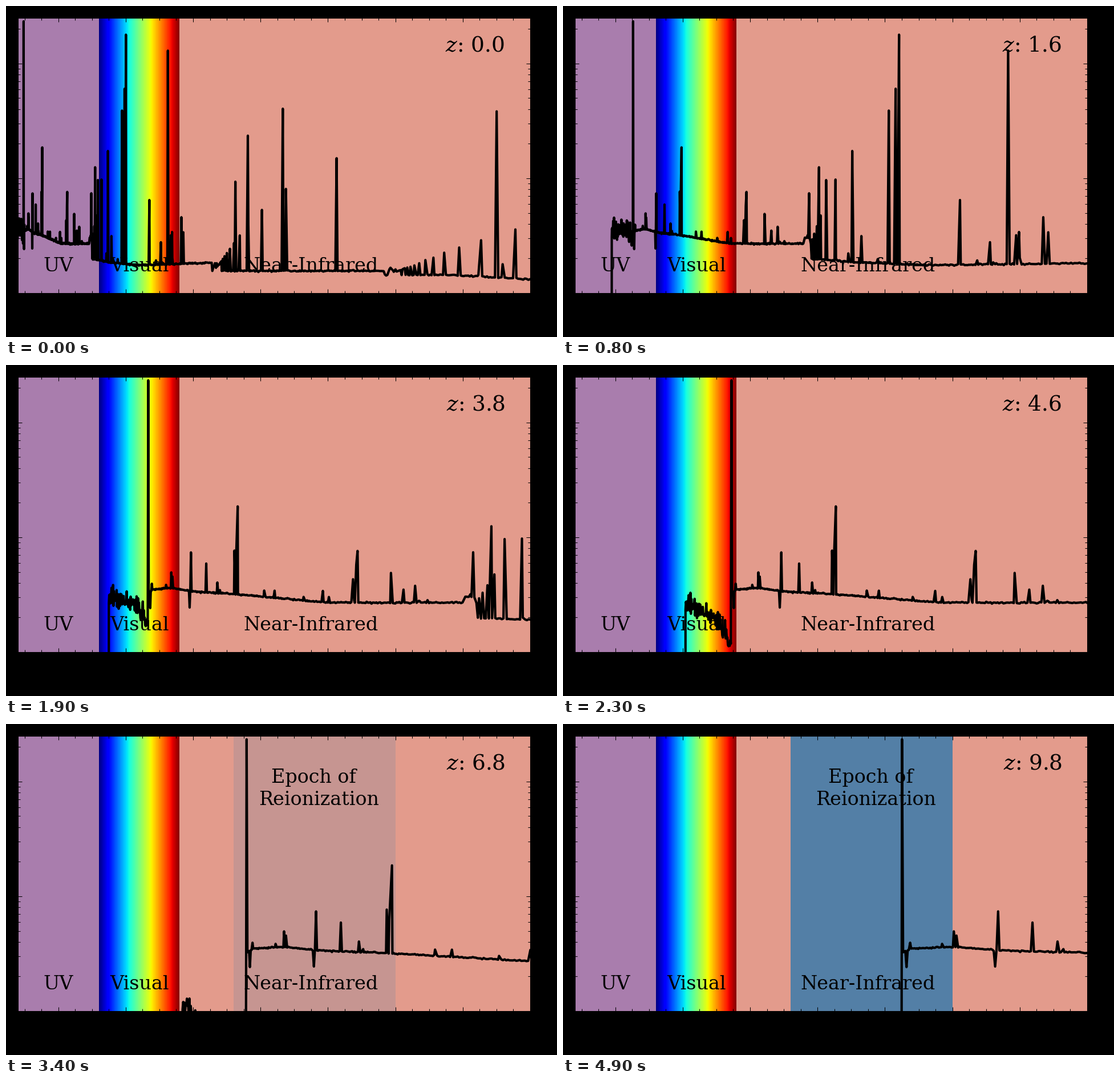
Recreate the animation shown at these times as a matplotlib script. Size 966 by 580 pixels, loop 5 s.

```python
import numpy as np
import matplotlib.pyplot as plt
from matplotlib.animation import FuncAnimation
from matplotlib.ticker import MultipleLocator

W, H, DPI = 966, 580, 150
LEFT, RIGHT, TOP, BOTTOM = 20.7, 919, 21, 503
FRAMES, INTERVAL, Z_STEP = 50, 100, 0.2
LYMAN_LIMIT, LYMAN_ALPHA = 911.76, 1216
EPOCH_START, LAYER_ALPHA = 9000, 0.075

plt.rcParams.update({
    "font.family": "DejaVu Serif",
    "mathtext.fontset": "dejavuserif",
    "axes.linewidth": 0.5,
})

# Key points of the continuum: rest wavelength in angstrom and flux.
CONTINUUM = [
    (912, 0.37), (1150, 0.36), (1200, 0.31), (1250, 0.35), (1400, 0.362),
    (1560, 0.337), (1850, 0.322), (2600, 0.27), (3735, 0.27), (3746, 0.2),
    (4400, 0.185), (5500, 0.175), (8200, 0.184), (8205, 0.156),
    (14580, 0.156), (14590, 0.144), (17000, 0.144), (20000, 0.132),
]

# Hydrogen series by lower level: strength of the first line, decay power.
SERIES = {2: (12.8, 3.05), 3: (3.7, 2.5), 4: (1.67, 2.2)}

# Helium and metal lines: rest wavelength and height above the continuum.
LINES = {
    1244: 0.05, 1394: 0.14, 1403: 0.09, 1546: 0.40, 1664: 0.26, 1750: 0.08,
    1882: 0.45, 1894: 0.30, 1907: 1.52, 2565: 0.07, 2798: 0.16, 2823: 0.31,
    2833: 0.49, 3091: 0.22, 3188: 0.08, 3726: 0.43, 3867: 0.95, 3969: 0.32,
    4472: 0.13, 4960: 5.86, 5009: 17.7, 5878: 0.47, 6306: 0.10, 6679: 0.14,
    6720: 0.16, 7066: 0.28, 7137: 0.16, 9068: 0.78, 9530: 2.20, 10826: 3.89,
    LYMAN_ALPHA: 23,
}


def build_spectrum(step=0.0032):
    """Sample at constant resolution; each line fills its nearest sample."""
    rng = np.random.default_rng(4)
    wave = 900 * np.exp(step * np.arange(int(np.log(20100 / 900) / step) + 1))
    points, levels = np.transpose(CONTINUUM)
    log_flux = np.interp(wave, points, np.log(levels))
    spread = np.where(wave < LYMAN_ALPHA, 0.1, 0.007)
    flux = np.exp(log_flux + spread * rng.normal(size=wave.size))

    def nearest(line):
        return np.abs(np.log(wave / line)).argmin()

    def add_line(line, height):
        i = nearest(line)
        wave[i] = line
        flux[i] += height

    for line in np.exp(rng.uniform(np.log(1300), np.log(19500), 30)):
        add_line(line, rng.exponential(0.02))
    for lower, (first, power) in SERIES.items():
        for upper in range(40, lower, -1):
            line = LYMAN_LIMIT / (lower ** -2 - upper ** -2)
            if line < 20000:
                add_line(line, first * ((upper - lower + 1) / 2) ** -power)
    for line, height in LINES.items():
        add_line(line, height)
    # Wind lines absorb just blueward of their peak.
    for line in (1242, 1549):
        flux[nearest(0.993 * line)] *= 0.72
    flux[wave < LYMAN_LIMIT - 1] = 1e-9
    return wave, flux


def absorbed(wave, flux, z):
    """Dim everything blueward of Lyman alpha by the intergalactic medium."""
    tau = 0.00095 * (wave * (1 + z) / LYMAN_ALPHA) ** 4
    return np.where(wave < LYMAN_ALPHA - 0.5, flux * np.exp(-tau), flux)


fig = plt.figure(figsize=(W / DPI, H / DPI), dpi=DPI, facecolor="black")
ax = fig.add_axes([LEFT / W, 1 - BOTTOM / H,
                   (RIGHT - LEFT) / W, (BOTTOM - TOP) / H])
ax.set_yscale("log")
ax.axvspan(1000, 4000, color="#a97dad", lw=0)
ax.axvspan(7000, 20000, color="#e39b8c", lw=0)
ax.pcolormesh(np.linspace(4000, 7000, 257), [0.1, 25],
              np.linspace(0, 1, 256)[None, :], cmap="jet", zorder=1)
epoch_span = ax.axvspan(EPOCH_START, 15000, color="#1f75b0", lw=0, alpha=0)
spectrum, = ax.plot([], [], color="black", lw=2)

ax.set(xlim=(1000, 20000), ylim=(0.1, 25))
ax.xaxis.set_major_locator(MultipleLocator(2500))
ax.xaxis.set_minor_locator(MultipleLocator(625))
ax.tick_params(which="both", direction="in", top=True, right=True, width=0.5,
               labelbottom=False, labelleft=False)
ax.tick_params(which="major", length=3.5)
ax.tick_params(which="minor", length=2)


def label(x, y, text):
    return fig.text(x / W, 1 - y / H, text, size=16, ha="center")


label(92, 465, "UV")
label(234.5, 465, "Visual")
label(534.5, 465, "Near-Infrared")
epoch_labels = [label(539, 103, "Epoch of"), label(549, 141.5, "Reionization")]
z_label = ax.text(0.95, 0.9, "", size=18, ha="right", va="center",
                  transform=ax.transAxes)

WAVE, FLUX = build_spectrum()


def update(frame):
    z = frame * Z_STEP
    spectrum.set_data(WAVE * (1 + z), absorbed(WAVE, FLUX, z))
    z_label.set_text(f"$z$: {z:.1f}")
    # One more translucent layer per step once Lyman alpha is in the epoch.
    first = int((EPOCH_START / LYMAN_ALPHA - 1) / Z_STEP)
    layers = max(0, frame - first)
    epoch_span.set_alpha(1 - (1 - LAYER_ALPHA) ** layers)
    for text in epoch_labels:
        text.set_visible(layers > 0)
    return [spectrum, z_label, epoch_span, *epoch_labels]


anim = FuncAnimation(fig, update, frames=FRAMES, interval=INTERVAL,
                     repeat=True, repeat_delay=0, blit=False)
plt.show()
```
